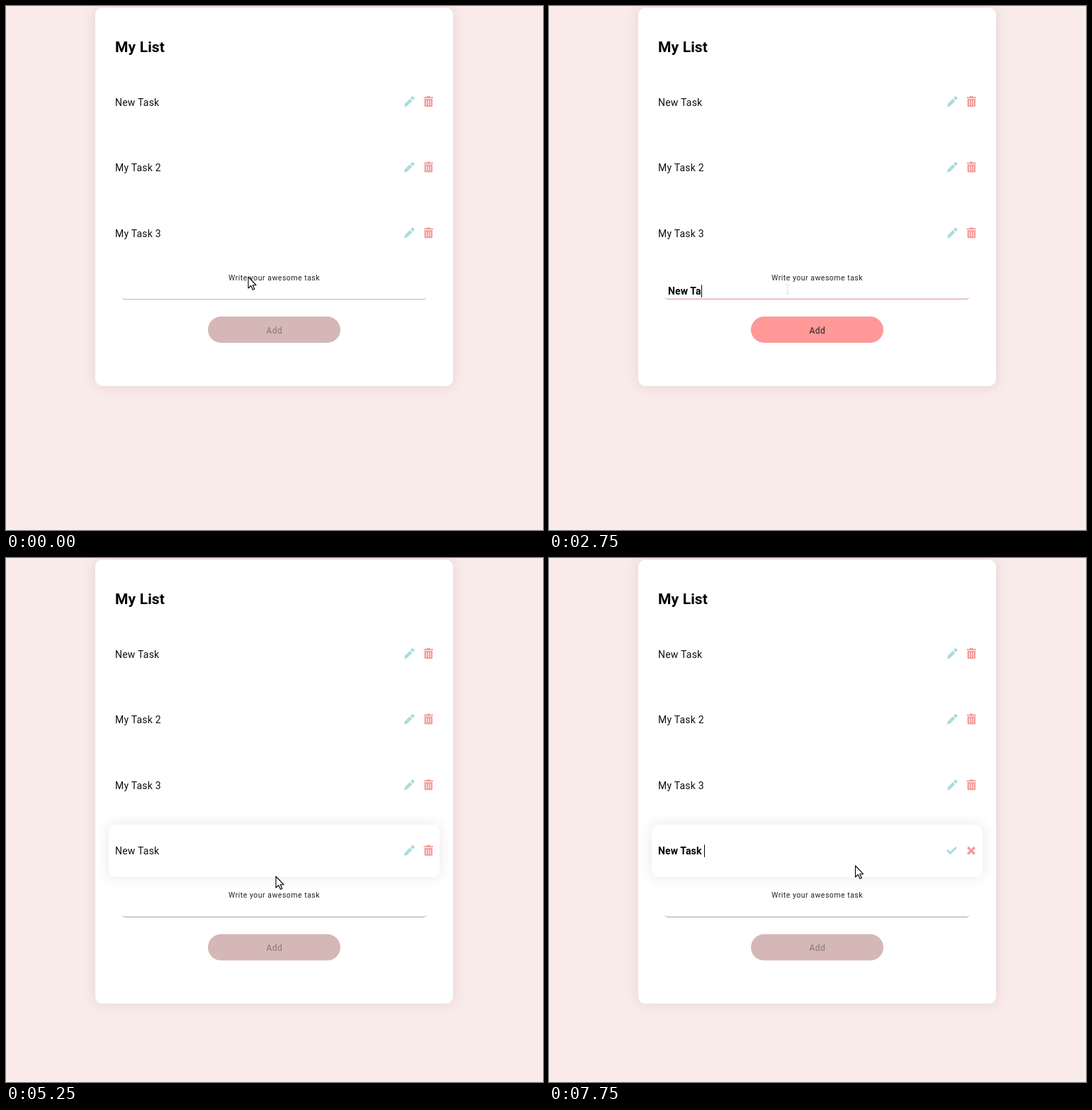
An HTML page for the animation above (8000 ms loop, 758x739 px).

```html
<!DOCTYPE html>
<html lang="en">
<head>
<meta charset="utf-8">
<title>My List</title>
<style>
  html, body { margin: 0; width: 100%; height: 100%; overflow: hidden; background: #f9ebea; }
  svg { display: block; }
  text { font: 14px Roboto, sans-serif; letter-spacing: .22px; fill: #111; white-space: pre; }
  .title { font-size: 21px; font-weight: 600; letter-spacing: .15px; fill: #000; }
  .label { font-size: 10.5px; letter-spacing: .5px; fill: #222; }
  .add { font-size: 12px; letter-spacing: .4px; }
  .typed { font-weight: 600; letter-spacing: .12px; fill: #000; }
  .card { fill: #fff; filter: drop-shadow(0 0 9px rgba(60, 20, 20, .11)); }
  .teal { fill: #abdcdd; }
  .pink { fill: #f69a99; }
  .pointer { fill: #fff; stroke: #000; stroke-width: 1.1; stroke-linejoin: round; }
  .beam { fill: none; stroke: #ddd; }
</style>
</head>
<body>
<svg id="stage" width="758" height="739" viewBox="0 0 758 739"></svg>
<script>
const STEP = 250, STEPS = 32, ROW = 92.6;

const icons = {
  pencil: 'M0 15 .8 11 8 3.7 11.3 7 4 14.2ZM8.9 2.8 10.9.8Q12 -.2 13.1.8L14.2 1.9Q15.2 3 14.2 4.1L12.2 6.1Z',
  trash: 'M0 1.2H4L4.6 0H8.6L9.2 1.2H13.2V3H0ZM.9 4H12.3V13.7Q12.2 15 11 15H2.2Q1 15 .9 13.7ZM3.3 6V13H4.2V6ZM6.2 6V13H7.1V6ZM9.1 6V13H10V6Z',
  check: 'M0 6.3 2 4.3 5.4 7.5 13 .2 15 2.2 5.4 11.5Z',
  cross: 'M2.4 0 6 3.6 9.6 0 12 2.4 8.4 6 12 9.6 9.6 12 6 8.4 2.4 12 0 9.6 3.6 6 0 2.4Z'
};

const cursors = {
  arrow: ['pointer', 'M0 0V16L3.8 12.5 6.4 18.3 8.8 17.3 6.3 11.7H11Z'],
  hand: ['pointer', 'M6 13V2.5a1.5 1.5 0 0 1 3 0V8q1.6-.9 2.8.3 1.7-.6 2.6.7 1.8-.2 2.1 1.2V15q0 2-1.5 4V21.5H7V19L1.3 13.5q-1-1.7.5-2.3 1.3-.3 2.3.8ZM9 8v3.5M11.8 8.3v3.2M14.4 9v2.5'],
  beam: ['beam', 'M-3-6.5H-.5M.5-6.5H3M0-6V6M-3 6.5H-.5M.5 6.5H3']
};

// Each entry starts at its step and holds until the next one.
const cursorTrack = [
  [0, 'arrow', 342, 382], [1, 'arrow', 339, 391], [2, 'beam', 336.5, 399.5],
  [16, 'beam', 343, 404], [17, 'arrow', 361, 419], [18, 'hand', 376, 442], [19, 'hand', 380, 448.5],
  [21, 'arrow', 381, 449], [22, 'arrow', 417, 443], [23, 'arrow', 503, 425],
  [24, 'hand', 562, 411], [26, 'arrow', 572, 420], [27, 'arrow', 548, 427],
  [29, 'arrow', 529, 419], [30, 'arrow', 480, 427], [31, 'arrow', 432.5, 434]
];
const typingTrack = [
  [0, ''], [7, 'N'], [8, 'New'], [9, 'New '], [11, 'New Ta'],
  [12, 'New Tas'], [14, 'New Task'], [20, '']
];

const at = (track, step) => track.findLast(entry => entry[0] <= step);
const within = (step, from, to) => step >= from && step < to;
const text = (x, y, cls, value, extra = '') => `<text x="${x}" y="${y}" class="${cls}" ${extra}>${value}</text>`;
const path = (x, y, cls, d) => `<path transform="translate(${x} ${y})" class="${cls}" fill-rule="evenodd" d="${d}"/>`;
const rect = (x, y, w, h, r, attrs) => `<rect x="${x}" y="${y}" width="${w}" height="${h}" rx="${r}" ${attrs}/>`;

function field(x, y, value, caret) {
  return text(x, y, 'typed', value, `data-caret="${caret ? 1 : ''}"`);
}

function row(index, name, editing, caret) {
  const y = index * ROW;
  return editing
    ? field(154, y + 140.5, name, caret) +
      path(561, y + 129, 'teal', icons.check) + path(590, y + 129, 'pink', icons.cross)
    : text(154, y + 140.5, '', name) +
      path(562, y + 127, 'teal', icons.pencil) + path(589.7, y + 127, 'pink', icons.trash);
}

function form(step) {
  const value = at(typingTrack, step)[1];
  const focused = within(step, 2, 19);
  const caret = within(step, 3, 5) || within(step, 7, 16) || step === 18;
  const inner = focused ? 3.3 : 3.9;
  const line = `M0 0a5 5 0 0 0 5 5H425.5a5 5 0 0 0 5-5a5 ${inner} 0 0 1-5 ${inner}H5a5 ${inner} 0 0 1-5-${inner}Z`;
  return text(314, 386.7, 'label', 'Write your awesome task') +
    `<g fill="${focused ? '#e9b5b3' : '#b3b0b0'}">${path(163.2, 409.3, '', line)}</g>` +
    field(168, 407.3, value, caret) +
    rect(285, 438, 187, 37, 18.5, `fill="${value ? '#ff9897' : '#d4b7b6'}"`) +
    text(367.5, 461.5, 'add', 'Add', `style="fill:${value ? '#222' : '#857878'}"`);
}

function scene(step) {
  const added = step >= 21, editing = step >= 25;
  const [, kind, x, y] = at(cursorTrack, step);
  const extra = added ? ROW : 0;
  return rect(126, 2.5, 505, 533.5 + extra, 10, 'class="card"') +
    text(154, 65, 'title', 'My List') +
    ['New Task', 'My Task 2', 'My Task 3'].map((name, i) => row(i, name)).join('') +
    (added
      ? rect(145, 376, 467, 74, 10, 'class="card"') +
        row(3, step === 31 ? 'New Task ' : 'New Task', editing, step >= 29)
      : '') +
    `<g transform="translate(0 ${extra})">${form(step)}</g>` +
    path(x, y, ...cursors[kind]);
}

const stage = document.getElementById('stage');
let shown = -1;

function frame(now) {
  const step = Math.floor(now / STEP) % STEPS;
  if (step !== shown) {
    shown = step;
    stage.innerHTML = scene(step);
    for (const el of stage.querySelectorAll('[data-caret="1"]')) {
      const x = Math.round(+el.getAttribute('x') + el.getComputedTextLength());
      el.insertAdjacentHTML('afterend', rect(x, +el.getAttribute('y') - 14, 1, 17.5, 0, 'fill="#000"'));
    }
  }
  requestAnimationFrame(frame);
}
requestAnimationFrame(frame);
</script>
</body>
</html>
```
